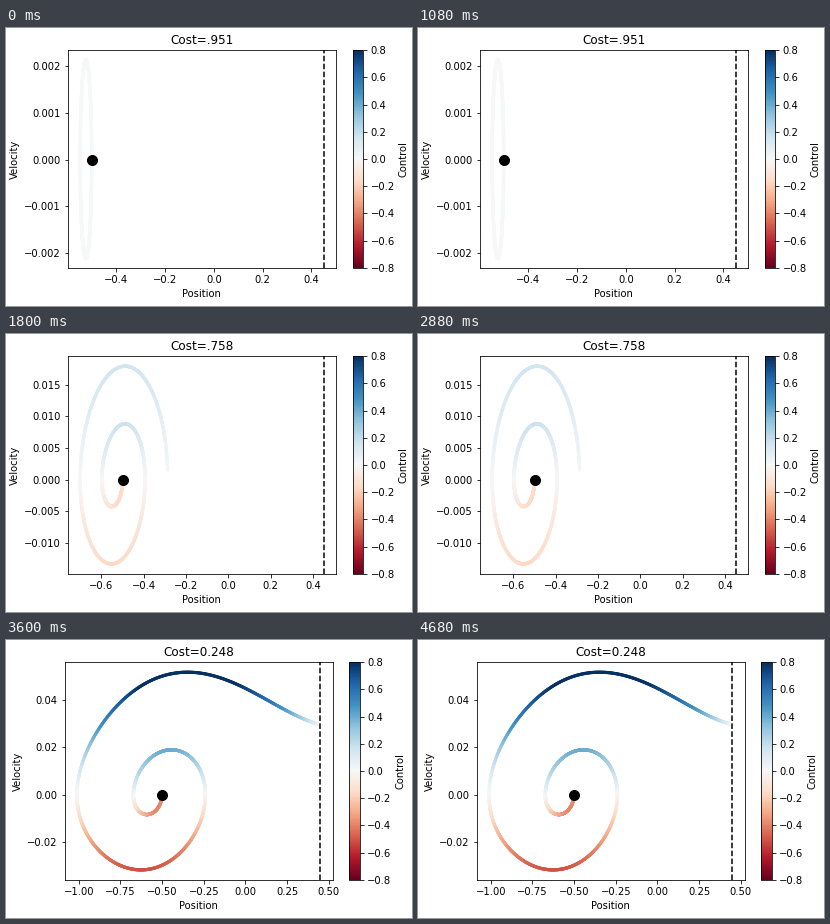
These frames come from a looping animation (406x278 px, 5.4 s). A matplotlib script:

```python
import numpy as np
import matplotlib.pyplot as plt
from matplotlib.animation import FuncAnimation

W, H, DPI = 406, 278, 72
GOAL = 0.45
HILL = 0.0025 / 3
START = -0.5
SWING = (0.5, 0.5)
PUSH = (0.1, 0.5)

plt.rcParams.update({"font.family": "DejaVu Sans", "font.size": 10})

# Each arc: end position, peak velocity, peak control, control profile exponents,
# final velocity, trimmed end angle
SCENES = [
    dict(title="Cost=.951", left=61.98, arcs=[
        (-np.pi / 3 - START, -0.00211, 0, SWING, 0, 0),
        (START, 0.002135, 0, SWING, 0, 0)]),
    dict(title="Cost=.758", left=61.98, arcs=[
        (-0.598, -0.00425, -0.16, PUSH, 0, 0),
        (-0.394, 0.0088, 0.17, SWING, 0, 0),
        (-0.7007, -0.0133, -0.165, SWING, 0, 0),
        (-0.287, 0.0179, 0.155, SWING, 0, 0.08)]),
    dict(title="Cost=0.248", left=58.8, arcs=[
        (-0.672, -0.0083, -0.39, PUSH, 0, 0),
        (-0.24, 0.019, 0.40, SWING, 0, 0),
        (-1.01, -0.0316, -0.51, SWING, 0, 0),
        (GOAL, 0.0517, 0.9, (0.7, 0.85), 0.0285, 0)]),
]


def swing_arc(x0, x1, v_peak, u_peak, shape, v_end, trim, n=500):
    """Phase-plane arc between two turning points, from the energy balance."""
    theta = np.linspace(0, np.pi, n)
    s = (1 - np.cos(theta)) / 2
    x = x0 + (x1 - x0) * s
    u = s ** shape[0] * np.clip(1 - s, 0, 1) ** shape[1]
    work = np.concatenate([[0], np.cumsum((u[1:] + u[:-1]) / 2 * np.diff(s))])
    climb = HILL * (np.sin(3 * x) - np.sin(3 * x0))
    energy = (climb[-1] + v_end ** 2 / 2) * work / work[-1] - climb
    v = np.sqrt(np.clip(2 * energy, 0, None))
    keep = theta <= np.pi - trim
    return np.array([x, v * v_peak / v.max(), u * u_peak / u.max()])[:, keep]


def trajectory(arcs):
    x0, parts = START, []
    for x1, *rest in arcs:
        parts.append(swing_arc(x0, x1, *rest))
        x0 = x1
    return np.hstack(parts)


def add_axes(left, width):
    return fig.add_axes([left / W, 38.25 / H, width / W, 217.44 / H])


def draw(i):
    scene = SCENES[i]
    fig.clear()
    ax = add_axes(scene["left"], 267.84)
    x, v, u = trajectory(scene["arcs"])
    dots = ax.scatter(x, v, c=u, s=5, cmap="RdBu", vmin=-0.8, vmax=0.8)
    ax.plot(START, 0, "ko", ms=10)
    ax.axvline(GOAL, color="k", ls="--")
    ax.set(title=scene["title"], xlabel="Position", ylabel="Velocity")
    cax = add_axes(scene["left"] + 284.58, 10.87)
    fig.colorbar(dots, cax=cax, label="Control")
    return []


fig = plt.figure(figsize=(W / DPI, H / DPI), dpi=DPI)
anim = FuncAnimation(fig, draw, frames=len(SCENES), interval=1800,
                     init_func=lambda: [], repeat=True, repeat_delay=0)
plt.show()
```
